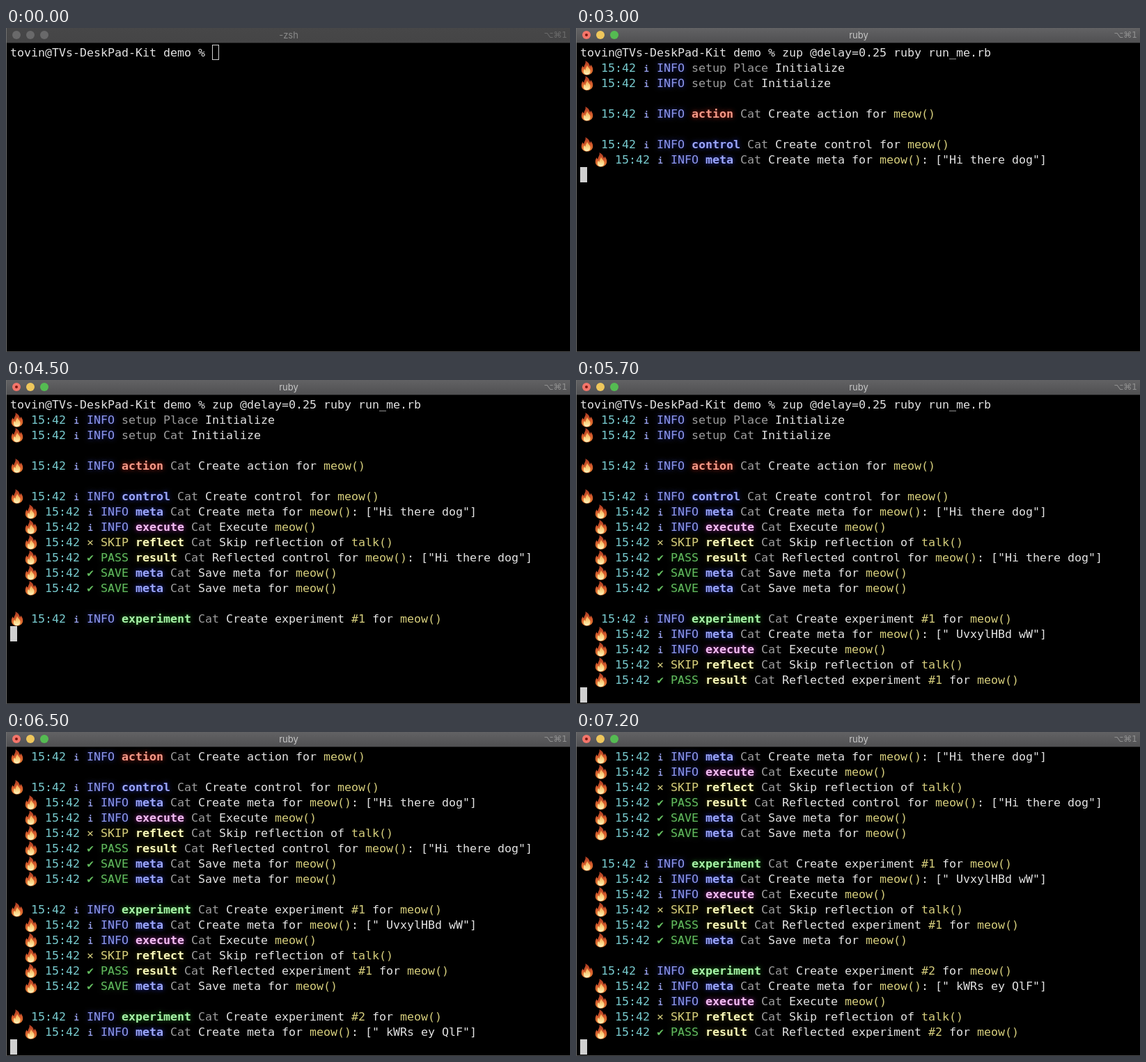
An HTML page with a canvas for the animation above (7300 ms loop, 810 by 466 pixels).

```html
<!DOCTYPE html>
<html lang="en">
<head>
<meta charset="utf-8">
<title>Terminal demo</title>
<style>
  html, body { margin: 0; width: 100%; height: 100%; overflow: hidden; background: #000; }
  canvas { display: block; }
</style>
</head>
<body>
<canvas id="stage" width="810" height="466"></canvas>
<script>
const ctx = document.getElementById('stage').getContext('2d');
const LOOP = 7300, COL = 10, ROW = 22, LEFT = 6, TOP = 24, LAST_ROW = 19;
const FIRST_LINE = 1900, LINE_DELAY = 258;
const MONO = '"DejaVu Sans Mono", "Liberation Mono", monospace';
const SANS = 'Inter, "Liberation Sans", sans-serif';
const WHITE = '#e2e2e2', GREY = '#9e9e9e', CYAN = '#78cbcf', YELLOW = '#d6ce7c';

const PROMPT = 'tovin@TVs-DeskPad-Kit demo % ';
const COMMAND = 'zup @delay=0.25 ruby run_me.rb';

// Each level: icon, text colour, glow
const LEVELS = {
  INFO: ['i', '#8d97ee', '#1c2690'],
  SKIP: ['×', '#d6ce7c', '#2a2800'],
  PASS: ['✔', '#64bd60', '#0a380a'],
  SAVE: ['✔', '#64bd60', '#0a380a']
};
// Each event: text colour, glow
const EVENTS = {
  action: ['#f59a88', '#b01c10'],
  control: ['#9ba6fa', '#202cac'],
  meta: ['#9ba6fa', '#202cac'],
  execute: ['#f3bdf2', '#962696'],
  reflect: ['#fafabc', '#484400'],
  result: ['#fafabc', '#484400'],
  experiment: ['#a8f3a8', '#127812']
};

// Log entries; a leading ">" indents, "|" puts a blank row before
const LOG = [
  'INFO setup Place Initialize',
  'INFO setup Cat Initialize',
  '|INFO action Cat Create action for meow()',
  '|INFO control Cat Create control for meow()',
  '>INFO meta Cat Create meta for meow(): ["Hi there dog"]',
  '>INFO execute Cat Execute meow()',
  '>SKIP reflect Cat Skip reflection of talk()',
  '>PASS result Cat Reflected control for meow(): ["Hi there dog"]',
  '>SAVE meta Cat Save meta for meow()',
  '>SAVE meta Cat Save meta for meow()',
  '|INFO experiment Cat Create experiment #1 for meow()',
  '>INFO meta Cat Create meta for meow(): [" UvxylHBd wW"]',
  '>INFO execute Cat Execute meow()',
  '>SKIP reflect Cat Skip reflection of talk()',
  '>PASS result Cat Reflected experiment #1 for meow()',
  '>SAVE meta Cat Save meta for meow()',
  '|INFO experiment Cat Create experiment #2 for meow()',
  '>INFO meta Cat Create meta for meow(): [" kWRs ey QlF"]',
  '>INFO execute Cat Execute meow()',
  '>SKIP reflect Cat Skip reflection of talk()',
  '>PASS result Cat Reflected experiment #2 for meow()'
];

let nextRow = 1;
const entries = LOG.map(source => {
  const indent = source[0] === '>' ? 2 : 0;
  if (source[0] === '|') nextRow++;
  const [level, event, subject, ...rest] = source.replace(/^[>|]/, '').split(' ');
  return { row: nextRow++, indent, level, event, subject, message: rest.join(' ') };
});

const FLAME = new Path2D('M7.4 0C11 1.6 13.6 4.6 14 8.4C14.8 7.8 15.1 6.8 15 5.6' +
  'C17.4 8 18.6 11 18.2 14C17.6 18.2 14 20.6 10 20.6C5.4 20.6 1.8 17.6 1.8 13.4' +
  'C1.8 10.8 2.6 8.8 3.6 7.2C3.9 8.4 4.4 9 5.4 9.6C5.8 6 8.6 3.6 7.4 0Z');
const CORE = new Path2D('M10 5.6C10 9.4 14.6 11 14.6 15C14.6 18.4 12.6 20.2 10 20.2' +
  'C7 20.2 4.8 18.4 4.8 15.4C4.8 13.6 5.4 12.4 6 11.4' +
  'C6.4 12.6 7 13.2 7.8 13.4C7.4 10.4 10 9 10 5.6Z');
const flameFill = ctx.createLinearGradient(0, 0, 0, 20);
flameFill.addColorStop(0, '#a83a22');
flameFill.addColorStop(0.5, '#d2572a');
flameFill.addColorStop(1, '#ea8136');
const coreFill = ctx.createLinearGradient(0, 6, 0, 20);
coreFill.addColorStop(0, '#f2a046');
coreFill.addColorStop(0.6, '#fbd585');
coreFill.addColorStop(1, '#fff2bc');

function flame(col, row) {
  ctx.save();
  ctx.translate(LEFT + col * COL, TOP + row * ROW + 1);
  ctx.fillStyle = flameFill;
  ctx.fill(FLAME);
  ctx.fillStyle = coreFill;
  ctx.fill(CORE);
  ctx.restore();
}

// Writes on the character grid and returns the column after the text
function write(text, col, row, color, glow, bold) {
  ctx.font = `${bold ? 'bold ' : ''}16.61px ${MONO}`;
  ctx.textAlign = 'left';
  ctx.fillStyle = color;
  ctx.shadowColor = glow || 'transparent';
  ctx.shadowBlur = glow ? 6 : 0;
  ctx.fillText(text, LEFT + col * COL, TOP + row * ROW + 17);
  ctx.shadowColor = 'transparent';
  return col + text.length;
}

function label(text, x, y, font, color, align) {
  ctx.font = font;
  ctx.fillStyle = color;
  ctx.textAlign = align;
  ctx.fillText(text, x, y);
}

function drawEntry(entry, row) {
  const [icon, color, glow] = LEVELS[entry.level];
  let col = entry.indent;
  flame(col, row);
  write('15:42', col + 3, row, CYAN);
  const iconX = LEFT + (col + 9.5) * COL, iconY = TOP + row * ROW + 17;
  if (icon === '×') write(icon, col + 9, row, color);
  else if (icon === 'i') label(icon, iconX, iconY, `bold 12px ${MONO}`, '#939ce6', 'center');
  else label(icon, iconX, iconY, '14px "DejaVu Sans", sans-serif', color, 'center');
  write(entry.level, col + 11, row, color, glow);

  const style = EVENTS[entry.event];
  col = write(entry.event, col + 16, row, style ? style[0] : GREY, style && style[1], !!style) + 1;
  col = write(entry.subject, col, row, GREY) + 1;
  for (const part of entry.message.split(/(\w+\(\)|#\d)/))
    col = write(part, col, row, /^(\w+\(\)|#\d)$/.test(part) ? YELLOW : WHITE);
}

function drawCursor(col, row, solid) {
  const x = LEFT + col * COL, y = TOP + row * ROW;
  if (solid) {
    ctx.fillStyle = '#d0d0d0';
    ctx.fillRect(x, y, COL, ROW);
  } else {
    ctx.strokeStyle = '#d0d0d0';
    ctx.lineWidth = 1;
    ctx.strokeRect(x + 0.5, y + 0.5, COL - 1, ROW - 1);
  }
}

function dot(x, r, color) {
  ctx.fillStyle = color;
  ctx.beginPath();
  ctx.arc(x, 10, r, 0, 7);
  ctx.fill();
}

function drawFrame(active, title) {
  const bar = ctx.createLinearGradient(0, 0, 0, 21);
  bar.addColorStop(0, active ? '#626264' : '#474748');
  bar.addColorStop(1, active ? '#505052' : '#454546');
  ctx.fillStyle = bar;
  ctx.fillRect(0, 0, 810, 21);
  ctx.fillStyle = '#1c1c1c';
  ctx.fillRect(0, 21, 810, 1);
  ctx.fillStyle = '#707070';
  ctx.fillRect(0, 0, 1, 466);
  ctx.fillStyle = '#4c4c4c';
  ctx.fillRect(0, 465, 810, 1);

  const lights = active ? ['#f5756a', '#efc75c', '#55bb52'] : Array(3).fill('#69696a');
  lights.forEach((color, i) => dot(15 + i * 20, 6, color));
  if (active) dot(15, 2, '#7d1712');
  label(title, 406, 15, `13px ${SANS}`, active ? '#c6c6c6' : '#8a8a8a', 'center');
  label('⌥⌘1', 806, 14, '12px "DejaVu Sans", sans-serif', active ? '#929292' : '#6c6c6c', 'right');
}

function draw(time) {
  const active = time >= 400, typed = time >= 800, entered = time >= 1100;
  const shown = entries.filter((_, i) => time >= FIRST_LINE + i * LINE_DELAY);
  const cursorRow = shown.length ? shown[shown.length - 1].row + 1 : +entered;
  const scroll = Math.max(0, cursorRow - LAST_ROW);

  ctx.fillStyle = '#000';
  ctx.fillRect(0, 0, 810, 466);
  if (!scroll) {
    write(PROMPT, 0, 0, WHITE);
    if (typed) write(COMMAND, PROMPT.length, 0, WHITE);
  }
  for (const entry of shown)
    if (entry.row >= scroll) drawEntry(entry, entry.row - scroll);

  const cursorCol = entered ? 0 : PROMPT.length + (typed ? COMMAND.length : 0);
  drawCursor(cursorCol, cursorRow - scroll, active);
  drawFrame(active, time >= 1600 ? 'ruby' : '-zsh');
}

const start = performance.now();
function tick() {
  const time = (performance.now() - start) % LOOP;
  draw(Math.floor(time / 100) * 100);
  requestAnimationFrame(tick);
}
tick();
</script>
</body>
</html>
```
